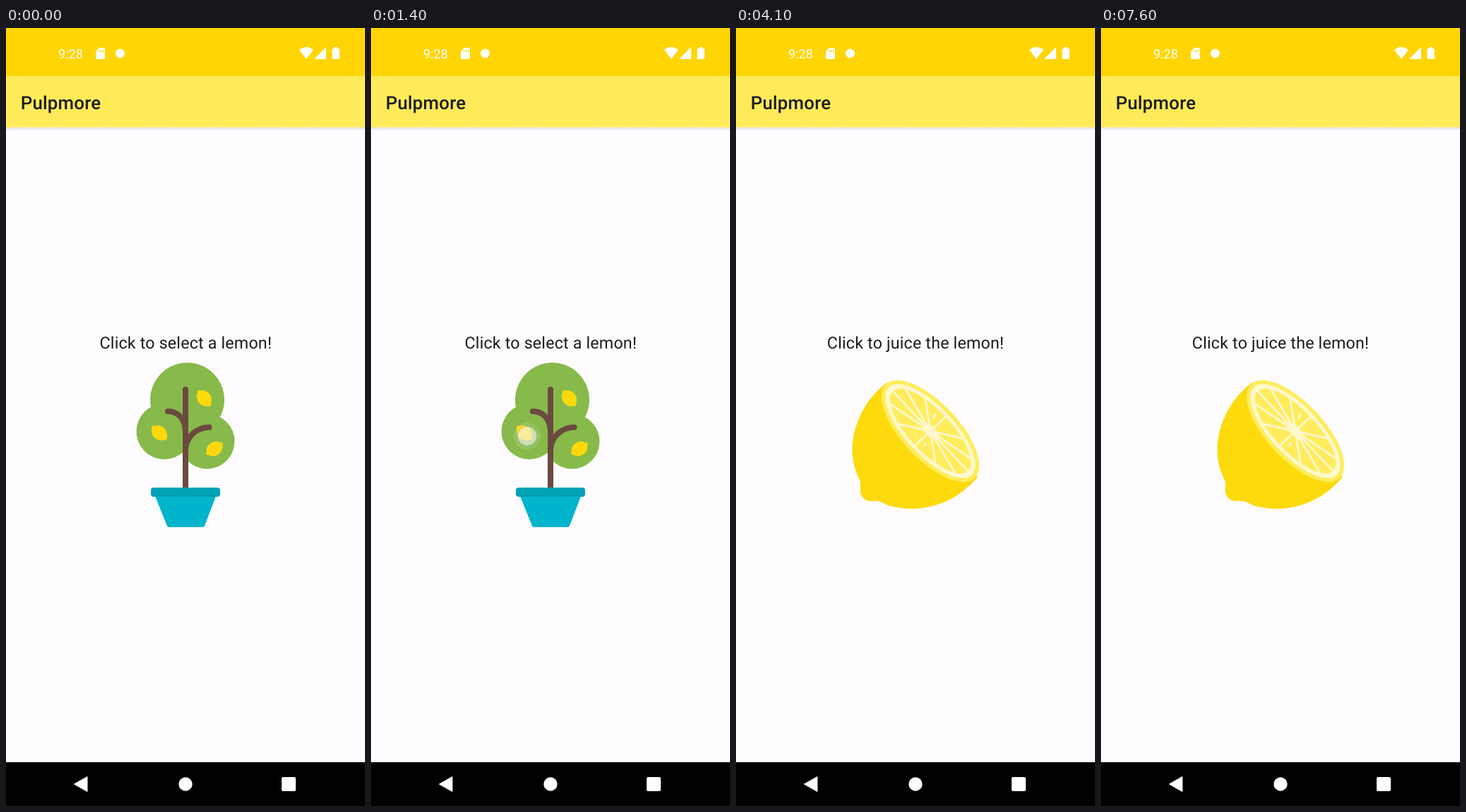
Recreate the animation shown at these times as an HTML page. Size 508 by 1102 pixels, loop 8 s.

```html
<!DOCTYPE html>
<html lang="en">
<head>
<meta charset="utf-8">
<title>Lemon app</title>
<style>
  html, body { margin: 0; width: 100%; height: 100%; overflow: hidden; background: #fffcff; }
  svg { display: block; width: 100vw; height: 100vh; }
  text { font-family: Roboto, sans-serif; text-rendering: geometricPrecision; }
  .prompt { font-size: 23.27px; letter-spacing: .17px; text-anchor: middle; fill: #1c1b1f; }
  .lemons { fill: #fdd90c; }
  .wood { fill: none; stroke: #6b4a40; stroke-width: 8; stroke-linecap: round; }
  .pith { fill: #fff8cc; }
  .flesh { fill: #ffec5c; }
</style>
</head>
<body>
<svg viewBox="0 0 508 1102" preserveAspectRatio="none">
  <defs>
    <linearGradient id="shade" x2="0" y2="1">
      <stop stop-color="#77727d" stop-opacity=".22"/>
      <stop offset="1" stop-color="#77727d" stop-opacity="0"/>
    </linearGradient>
    <path id="fruit" d="M-14 0C-14 -2 -12 -2 -11 -4C-7 -11 6 -12 11 -4C12 -2 14 -2 14 0C14 2 12 2 11 4C6 12 -7 11 -11 4C-12 2 -14 2 -14 0Z"/>
  </defs>

  <rect width="508" height="1102" fill="#fffcff"/>
  <rect y="140.600" width="508" height="5" fill="url(#shade)"/>
  <rect width="508" height="69" fill="#ffd504"/>
  <rect y="68.200" width="508" height="72.400" fill="#ffeb59"/>
  <text x="20.700" y="115" font-size="25.870" letter-spacing=".2" font-weight="500" fill="#1c1b1f">Pulpmore</text>

  <g id="status" fill="#fff">
    <text x="74" y="43" font-size="18.100">9:28</text>
    <path fill-rule="evenodd" d="M132 28H138.500Q140 28 140 29.500V42.500Q140 44 138.500 44H128.500Q127 44 127 42.500V33ZM131 31V34H132.500V31ZM134 31V34H135.500V31ZM137 31V34H138.500V31Z"/>
    <circle cx="161.500" cy="36" r="6.500"/>
    <path d="M415 31Q425 23 435 31L425 44Z"/>
    <path d="M453 27V44H436Z"/>
    <path d="M464.500 27H469V29H470.500Q472 29 472 30.500V42.500Q472 44 470.500 44H463Q461.500 44 461.500 42.500V30.500Q461.500 29 463 29H464.500Z"/>
  </g>

  <rect y="1040" width="508" height="62"/>
  <g fill="#fff">
    <path d="M96.500 1071L115 1060.500V1081.500Z" stroke="#fff" stroke-linejoin="round"/>
    <circle cx="254" cy="1071" r="9.700"/>
    <rect x="390" y="1061" width="20" height="20" rx="2"/>
  </g>

  <g id="tree">
    <text class="prompt" x="254.300" y="454.300">Click to select a lemon!</text>
    <g fill="#87ba4b">
      <circle cx="256.500" cy="526.500" r="52.500"/>
      <circle cx="224" cy="571.500" r="39.500"/>
      <circle cx="284.500" cy="585.500" r="39"/>
    </g>
    <path class="wood" d="M254 512V652M229 543C243 543 253 553 254 570M287.500 565.500C268 566 255 580 254 597"/>
    <g class="lemons">
      <use href="#fruit" transform="translate(217 573.500) rotate(42)"/>
      <use href="#fruit" transform="translate(280.500 524.500) rotate(52)"/>
      <use href="#fruit" transform="translate(295 596) rotate(-35)"/>
    </g>
    <path d="M210.500 662H297.500L281.500 704Q280.500 707 278 707H231Q228.500 707 227.500 704Z" fill="#00b4cb"/>
    <rect x="205" y="651" width="98" height="13" rx="4" fill="#00a2b5"/>
  </g>

  <g id="lemon">
    <text class="prompt" x="254" y="454.300">Click to juice the lemon!</text>
    <path fill="#fcda0c" d="M214 502C186 522 164 560 164.500 600C165 615 169 629 175 640C178 648 174 653 177 661C180 668 186 671 194 670C203 669 208 673 215 676C262 690 310 674 342 636Z"/>
    <g transform="translate(275 571) rotate(46.800)">
      <ellipse class="flesh" rx="91.400" ry="40"/>
      <ellipse class="pith" rx="85.500" ry="34.500"/>
      <ellipse class="flesh" rx="77.500" ry="29.500"/>
      <g id="spokes" stroke="#fff8cc" stroke-width="3"></g>
      <ellipse class="pith" rx="15" ry="7"/>
    </g>
    <g class="pith">
      <path d="M283 545Q284 552 278 555Q278 548 283 545Z"/>
      <path d="M270 586Q270 592 265 594Q265 588 270 586Z"/>
      <path d="M308 606L312 610L309 609Z"/>
    </g>
  </g>

  <g id="touches"></g>
</svg>
<script>
  const LOOP = 8000, SWITCH = 1500;
  const NS = 'http://www.w3.org/2000/svg';
  const byId = id => document.getElementById(id);

  function add(parent, tag, attrs) {
    const node = document.createElementNS(NS, tag);
    for (const key in attrs) node.setAttribute(key, attrs[key]);
    return parent.appendChild(node);
  }

  // Visible only between the two times, with hard edges.
  function showBetween(node, from, to) {
    const steps = [[0, from === 0 ? 1 : 0], [from, 1], [to, 0], [LOOP, to === LOOP ? 1 : 0]];
    node.animate(
      steps.map(([time, opacity]) => ({ offset: time / LOOP, opacity, easing: 'step-end' })),
      { duration: LOOP, iterations: Infinity });
  }

  for (let i = 0; i < 12; i++) {
    const angle = i * Math.PI / 6;
    add(byId('spokes'), 'line', { x2: 79 * Math.cos(angle), y2: 31 * Math.sin(angle) });
  }

  const touches = [
    { x: 221, y: 578, from: 1300, to: SWITCH, fill: .58, halo: .12 },
    { x: 251.5, y: 604, from: 2600, to: 2900, fill: .2, halo: 0 },
    { x: 251.5, y: 604, from: 5700, to: 6000, fill: .2, halo: 0 }
  ];
  for (const { x, y, from, to, fill, halo } of touches) {
    const group = add(byId('touches'), 'g', { transform: `translate(${x} ${y})` });
    add(group, 'circle', { r: 19, fill: '#fff', 'fill-opacity': halo });
    add(group, 'circle', {
      r: 13.8, fill: '#f4f4f0', 'fill-opacity': fill,
      stroke: '#88866e', 'stroke-opacity': .28, 'stroke-width': 1.5
    });
    showBetween(group, from, to);
  }

  showBetween(byId('tree'), 0, SWITCH);
  showBetween(byId('lemon'), SWITCH, LOOP);
</script>
</body>
</html>
```
